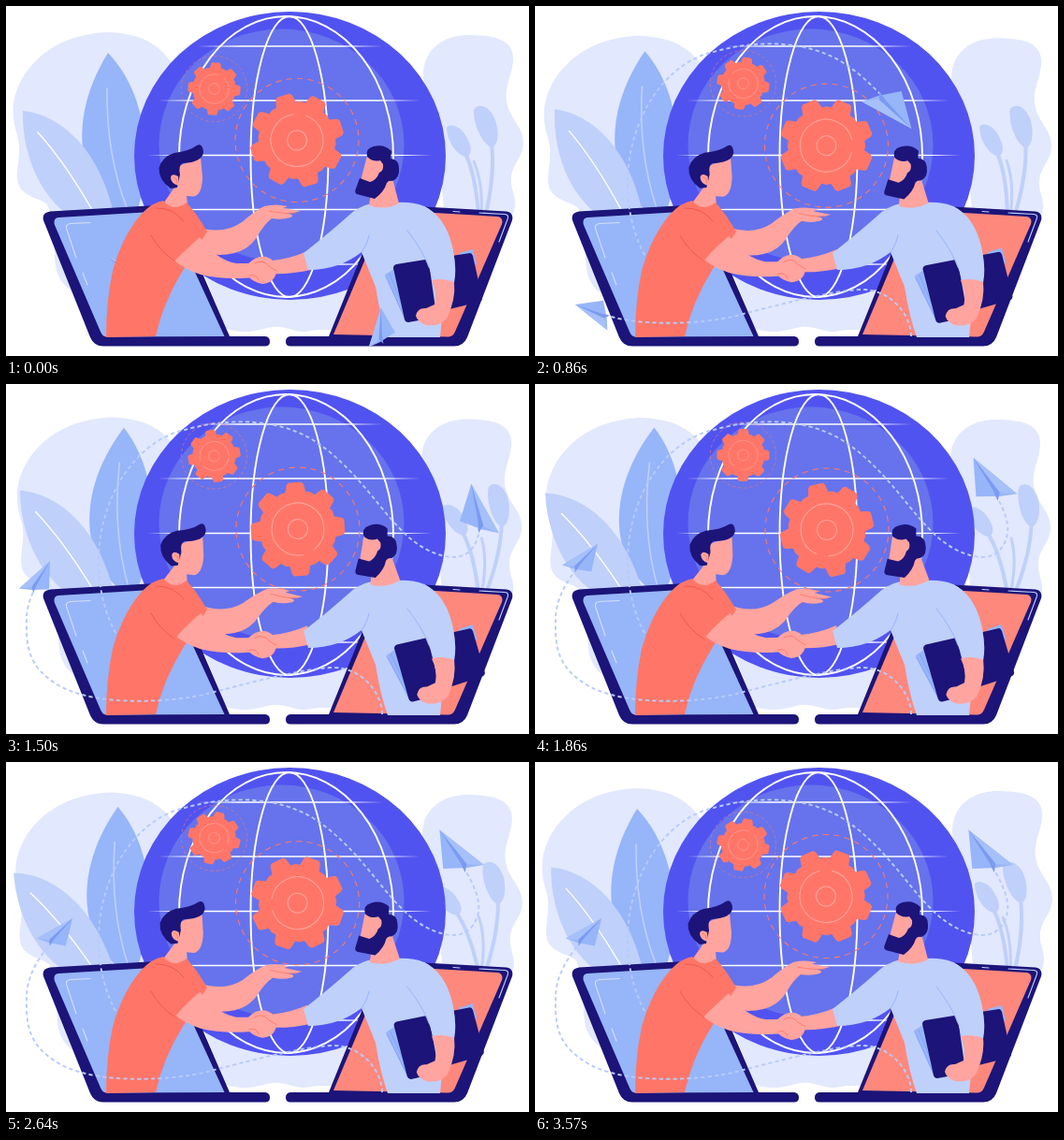
Write an HTML page that moves like this. It is 559 px wide and 374 px high and loops after 3.64 s.

```html
<!DOCTYPE html>
<html lang="en">
<head>
<meta charset="utf-8">
<title>Business handshake</title>
<style>
html, body { margin: 0; width: 100%; height: 100%; overflow: hidden; background: #fff; }
svg { display: block; width: 100vw; height: 100vh; }
.line { fill: none; stroke-linecap: round; stroke-linejoin: round; }
.navy { fill: #1c1479; }
.coral { fill: #ff7668; }
.skin { fill: #ffa49f; }
.blue { fill: #97b5f9; }
.pale { fill: #bfd0fa; }
.mist { fill: #e2e8fd; }
.trail { fill: none; stroke: #b7cbfb; stroke-width: 1.9; stroke-dasharray: 4.2 3.2; }
.reveal { fill: none; stroke: #fff; stroke-width: 8; }
</style>
</head>
<body>
<svg viewBox="0 0 559 374" preserveAspectRatio="none">
  <defs>
    <path id="pathLow" d="M402 353C402 330 380 303 350 303S250 322 215 331S100 345 60 324S22 275 22 252S35 208 51 190"/>
    <path id="pathHigh" d="M140 295C116 275 99 235 99 190C99 120 140 60 191 49C240 35 290 38 325 58C375 88 400 138 432 165C452 182 484 194 498 176C510 160 508 142 486 108"/>
    <mask id="maskLow" maskUnits="userSpaceOnUse" x="0" y="0" width="559" height="374"><use id="showLow" href="#pathLow" class="reveal"/></mask>
    <mask id="maskHigh" maskUnits="userSpaceOnUse" x="0" y="0" width="559" height="374"><use id="showHigh" href="#pathHigh" class="reveal"/></mask>
    <g id="plane">
      <path fill="#97b5f9" d="M42 0L-15 20L-8 3L5 -19Z"/>
      <path fill="#a6c0fa" d="M42 0L-15 20L-3 2Z"/>
      <path fill="#7b9bf2" d="M42 0L1 0L-11 -1.5L-4 5Z"/>
    </g>
    <g id="gear">
      <path id="teeth" class="coral"/>
      <g class="line" stroke="#ffa49f" stroke-width="1.1">
        <circle r="10.5"/>
        <path d="M22.2 17A28 28 0 1 1 27.6 4.5"/>
      </g>
    </g>
    <circle id="ring" r="66" fill="none" stroke="#ff7668" stroke-width="1.1" stroke-dasharray="6.2 5.3"/>
  </defs>

  <!-- backdrop -->
  <g id="blobL"><path class="mist" d="M190 80C172 52 160 30 109 28C62 30 36 50 20 73C4 98 6 120 12 138C18 158 9 175 13 190C18 204 36 205 44 212C56 240 48 270 56 288C66 310 100 330 190 300Z"/></g>
  <g id="blobR"><path class="mist" d="M446 75C446 45 468 32 493 31C523 31 543 36 542 58C541 76 531 88 536 106C540 122 553 130 553 146C553 162 541 168 540 184C539 200 548 204 542 222L470 240L462 150C454 120 447 100 446 75Z"/></g>
  <path class="mist" d="M205 270H390L366 340C352 350 340 344 326 347C310 351 300 341 285 343C270 345 260 352 235 345Z"/>

  <g id="leafTall">
    <path class="blue" d="M130 226C88 210 56 136 109 50C153 96 157 172 138 226Z"/>
    <path class="line" stroke="#bfd0fa" stroke-width="1.6" d="M108 88Q107 160 130 218"/>
  </g>
  <g id="leafPale">
    <path class="pale" d="M18 112C56 116 100 150 116 226L70 226C34 202 17 155 18 112Z"/>
    <path class="line" stroke="#fff" stroke-width="1.4" d="M34 135Q62 166 91 216"/>
  </g>
  <g class="pale">
    <g id="sprigA">
      <path d="M471 130C474 125 485 128 491 138C498 149 499 159 492 161C482 160 471 144 471 130Z"/>
      <path class="line" stroke="#bfd0fa" stroke-width="4" d="M491 158Q502 180 505 224"/>
    </g>
    <g id="sprigB">
      <path d="M500 111C504 103 517 106 523 122C528 138 525 150 519 151C508 147 499 124 500 111Z"/>
      <path class="line" stroke="#bfd0fa" stroke-width="4" d="M519 147Q523 180 512 226"/>
      <path class="line" stroke="#bfd0fa" stroke-width="3" d="M500 166Q510 188 508 224"/>
    </g>
  </g>

  <!-- globe -->
  <ellipse cx="303.5" cy="160" rx="166.5" ry="154" fill="#5153f0"/>
  <ellipse cx="294.5" cy="148.5" rx="131" ry="124" fill="#6673ec"/>
  <g class="line" stroke="#fff" stroke-width="1.9">
    <ellipse cx="299.5" cy="161" rx="114.5" ry="150"/>
    <ellipse cx="303" cy="161" rx="41.5" ry="150"/>
  </g>
  <g id="parallels" fill="#fff"></g>

  <g id="smallSpot"><use id="smallRing" href="#ring"/><use id="smallGear" href="#gear"/></g>
  <g id="bigSpot"><use id="bigRing" href="#ring"/><use id="bigGear" href="#gear"/></g>

  <!-- left laptop -->
  <path class="navy" d="M47 219.5L178 212L239 353H277Q282 353.5 282 358.5Q282 363.5 277 363.5H104Q94 363.5 90 354L40 229Q38 221 47 219.5Z"/>
  <path class="blue" d="M56 226L172 219L233.5 353L107 353.5Q103 353 101 348L52 234Q50 227 56 226Z"/>
  <path class="line" stroke="#d5e0fc" stroke-width="1.1" d="M90 231.5L69 232.5Q63 233 65 239L75 269M82 285L87 298"/>

  <!-- right laptop -->
  <path class="navy" d="M402 212L535 219.5Q543 221 541 229L493 354Q489 363.5 479 363.5H304Q299 363.5 299 358.5Q299 353.5 304 353H345Z"/>
  <path fill="#ff887c" d="M406 218L525 225Q532 226 530 233L480 348Q478 353 473 353.5L350 351Z"/>
  <path class="line" stroke="#bfd0fa" stroke-width="1.1" d="M478 219.5L485 220M506 221L533 222.5Q538 223 536 228L527 252"/>

  <g mask="url(#maskHigh)"><use href="#pathHigh" class="trail"/></g>
  <use id="planeHigh" href="#plane"/>

  <!-- left man -->
  <g id="armUp">
    <path class="skin" d="M204 236Q232 245 252 231Q266 219 276 214Q288 211 301 214L296 216L315 219Q306 222 299 221.5Q310 223 304 226Q294 229 284 227Q276 233 268 247Q256 266 228 266Q210 266 200 255Z"/>
    <path class="line" stroke="#ff7668" stroke-width=".8" d="M281 219Q290 221 299 221.5L310 221"/>
  </g>
  <g id="headL">
    <path class="skin" d="M182 172L208 162L210 182Q210 201 201 203.5L193 203L194 212Q184 224 166 214L180 194Z"/>
    <path class="navy" d="M176 195Q163 186 163.5 173Q167 161 180 157Q196 155 204 149Q210 146 211 156Q210 167 189 168Q184 170 186 180L183 194Z"/>
    <path class="skin" d="M185 192Q176 190 176 183Q177 178 184 182Z"/>
    <path class="line" stroke="#ff7668" stroke-width=".9" d="M179 183Q183 184 183 189"/>
  </g>
  <path class="coral" d="M168 208Q179 221 193 210Q204 222 215 241L190 281Q168 316 160 353L107 354Q107 316 114 283Q125 244 145 222Q156 210 168 208Z"/>
  <path class="line" stroke="#f0584f" stroke-width="1" d="M155 245Q164 262 181 273M160 216Q178 215 190 230"/>

  <!-- right man -->
  <g id="shake">
    <path class="skin" d="M207 247Q224 271 246 275L264 275L266 290Q232 293 208 287Q190 281 180 272Z"/>
    <path class="skin" d="M322 262Q304 270 284 272L282 286Q304 287 326 282Z"/>
    <path class="skin" d="M258 276Q268 266 278 268Q290 272 289 284Q287 296 274 297Q264 295 259 289Z"/>
    <path class="line" stroke="#ff7668" stroke-width=".9" d="M266 275Q274 270 281 278L289 283M260 288Q268 286 270 293"/>
  </g>
  <path class="coral" d="M214 241Q196 253 180 273L176 262L195 232Z"/>
  <g id="bookBack">
    <path class="blue" d="M484 264L499 260L503 276L488 282Z"/>
    <path class="navy" d="M470 268L496 264Q498 264 499 267L509 312Q509 315 506 316L462 327Z"/>
  </g>
  <path class="pale" d="M391 211Q404 217 418 210Q434 209 447 214Q471 226 478 262Q482 294 468 312L464 354L408 354Q400 332 395 300L380 263Q356 282 323 282L318 264Q346 242 365 225Q376 214 391 211Z"/>
  <path class="line" stroke="#97b5f9" stroke-width="1" d="M380 263Q386 255 388 245"/>
  <g id="headR">
    <path class="skin" d="M391 196L412 180L420 211Q405 219 388 213Z"/>
    <path class="skin" d="M386 160L380 183L378 195L400 203L408 184L408 163Z"/>
    <path class="navy" d="M386 161Q384 152 393 150Q404 147 412 155L411 163Q420 164 420 173Q421 184 413 187Q409 186 407 189Q404 199 394 206L375 201Q372 199 374 195L378 184L389 188Q396 186 399 178Q404 176 403 169L400 165Q392 167 386 161Z"/>
  </g>
  <g id="bookFront">
    <path class="blue" d="M405 287L418 279L431 336L427 337Z"/>
    <path class="line" stroke="#7b9bf2" stroke-width=".7" d="M406 289L426 333M410 286L428 331"/>
    <path class="navy" d="M417 276L448 271Q451 271 452 274L460 330Q460 333 457 333L430 338Q427 338 426 335L414 280Q414 277 417 276Z"/>
  </g>
  <path class="pale" d="M447 214Q471 226 478 262Q482 280 479 296Q467 290 456 293Q451 268 430 240Z"/>
  <path class="line" stroke="#97b5f9" stroke-width="1" d="M429 240Q446 262 452 279"/>
  <path id="hand" class="skin" d="M455 293Q467 290 479 295Q481 314 471 334Q463 343 449 341Q440 338 438 331Q440 322 449 323L458 319Q461 306 455 293Z"/>

  <g mask="url(#maskLow)"><use href="#pathLow" class="trail"/></g>
  <use id="planeLow" href="#plane"/>
</svg>
<script>
const LOOP = 3640, STEPS = 51, FLIGHT = 2150, TAU = Math.PI * 2;
const $ = id => document.getElementById(id);
const pose = (id, value) => $(id).setAttribute('transform', value);

// same curve as the CSS "ease" timing function
function ease(x) {
  if (x >= 1) return 1;
  let low = 0, high = 1, u = .5;
  for (let i = 0; i < 20; i++) {
    u = (low + high) / 2;
    if (.75 * u * (1 - u) + u ** 3 < x) low = u; else high = u;
  }
  return .3 * u * (1 - u) ** 2 + 3 * u * u * (1 - u) + u ** 3;
}

function gearPath(count, tip, root) {
  const points = [];
  const add = (radius, angle) =>
    points.push((radius * Math.cos(angle)).toFixed(2) + ' ' + (radius * Math.sin(angle)).toFixed(2));
  for (let i = 0; i < count; i++) {
    const mid = i * TAU / count;
    add(root, mid - .27); add(tip - 2, mid - .19); add(tip, mid - .14);
    add(tip, mid + .14); add(tip - 2, mid + .19); add(root, mid + .27);
    add(root + .8, mid + TAU / count / 2);
  }
  return 'M' + points.join('L') + 'Z';
}
$('teeth').setAttribute('d', gearPath(8, 50.5, 41));

// parallels taper to a point at both ends
$('parallels').innerHTML = [[43, 204, 403], [101, 162, 443], [159.5, 151, 455], [217.5, 162, 443], [276, 204, 403]]
  .map(([y, a, b]) => `<path d="M${a} ${y}L${a + 45} ${y - .8}H${b - 45}L${b} ${y}L${b - 45} ${y + .8}H${a + 45}Z"/>`)
  .join('');

const routes = ['Low', 'High'].map(name => {
  const path = $('path' + name);
  return { name, path, length: path.getTotalLength(), size: name === 'Low' ? '.73 -.73' : '1' };
});

function fly({ name, path, length, size }, progress) {
  const done = progress * length;
  const from = path.getPointAtLength(Math.max(0, done - 3));
  const to = path.getPointAtLength(Math.min(length, done + 3));
  const at = path.getPointAtLength(done);
  const turn = Math.atan2(to.y - from.y, to.x - from.x) * 360 / TAU;
  $('show' + name).setAttribute('stroke-dasharray', `${done} 2000`);
  pose('plane' + name, `translate(${at.x} ${at.y}) rotate(${turn}) scale(${size})`);
}

function draw(ms) {
  const phase = Math.floor((ms % LOOP + 4) / LOOP * STEPS) % STEPS / STEPS;
  const sway = (1 - Math.cos(phase * TAU)) / 2;
  const late = Math.cos((phase - .17) * TAU) - .48;
  const spin = phase * 360;

  pose('blobL', `translate(${4.5 * sway} ${8 * sway})`);
  pose('blobR', `translate(${-2 * sway} ${7 * sway})`);
  pose('leafTall', `translate(0 ${-2.5 * sway}) rotate(${6 * sway} 128 225)`);
  pose('leafPale', `rotate(${3.5 * late} 88 228)`);
  pose('sprigA', `rotate(${6 * late} 505 224)`);
  pose('sprigB', `rotate(${8.5 * sway} 512 226)`);

  pose('bigSpot', `translate(${311 + sway} ${143.5 + 12.5 * sway})`);
  pose('smallSpot', `translate(222.5 ${88.5 - 12.5 * sway}) scale(.56)`);
  pose('bigGear', `rotate(${spin - 107})`);
  pose('smallGear', `rotate(${-spin - 86})`);
  pose('bigRing', `rotate(${-spin})`);
  pose('smallRing', `rotate(${spin}) scale(.95)`);

  pose('headL', `rotate(${3.2 * sway} 188 207)`);
  pose('armUp', `rotate(${5 * sway} 215 250)`);
  pose('shake', `translate(0 ${-4 * sway})`);
  pose('headR', `rotate(${-6 * sway} 404 198)`);
  pose('bookBack', `translate(0 ${sway}) rotate(${-4 * sway} 440 265)`);
  pose('bookFront', `translate(0 ${sway}) rotate(${-4 * sway} 440 265)`);
  pose('hand', `rotate(${-2 * sway} 467 292)`);

  const progress = ease(phase * LOOP / FLIGHT);
  routes.forEach(route => fly(route, progress));
}

const start = performance.now();
function tick() {
  draw(performance.now() - start);
  requestAnimationFrame(tick);
}
tick();
</script>
</body>
</html>
```
